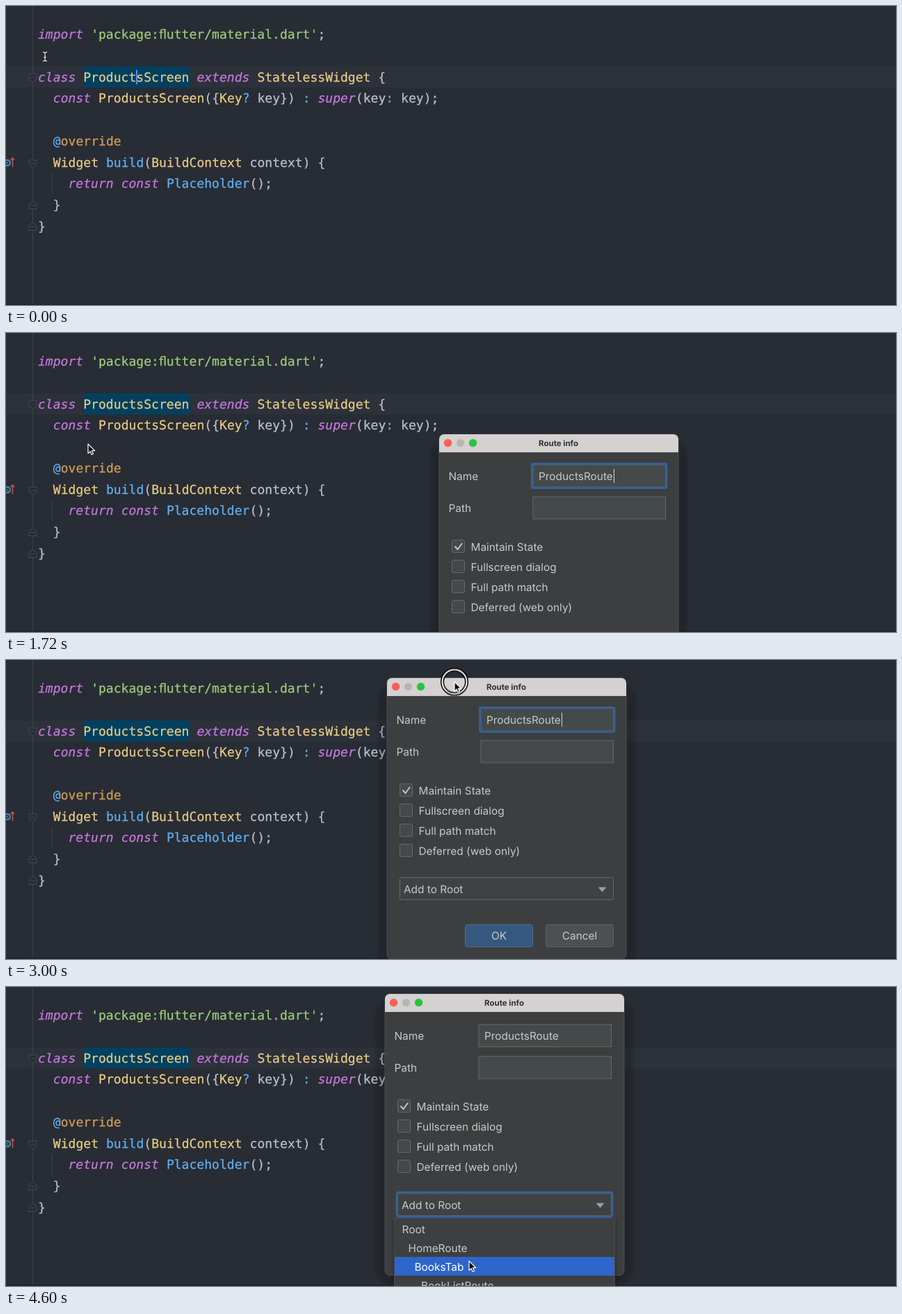
These frames come from a looping animation (1280x431 px, 4.64 s). An HTML page:

```html
<!DOCTYPE html>
<html lang="en">
<head>
<meta charset="utf-8">
<title>Add route from editor</title>
<style>
  html, body { margin: 0; width: 100%; height: 100%; overflow: hidden; background: #282c34; }
  svg { display: block; width: 100%; height: 100%; }
  text { white-space: pre; text-rendering: geometricPrecision; }

  /* A hairline stroke gives the code its slightly heavy weight. */
  .code { font: 18.07px "DejaVu Sans Mono", monospace; color: #bbbfc8; }
  .code text, .code tspan { fill: currentColor; stroke: currentColor; stroke-width: .25; }
  .key { color: #c678dd; font-style: italic; }
  .type { color: #e9cb82; }
  .str { color: #9bcb7b; }
  .fn { color: #61afef; }
  .note { color: #d19a56; }
  .fold { fill: #282c34; stroke: #454a52; }

  .ui { font: 15.4px Inter, sans-serif; fill: #c8cacb; }
  .menu { font-size: 15.3px; }
  .hint { font-size: 14.3px; fill: #7e8182; }
  .title { font-size: 11.5px; font-weight: 700; fill: #303030; }
  .white { fill: #fff; }
  .mid { text-anchor: middle; }
  .field { fill: #434a49; stroke: #666969; }
  .focus { fill: none; stroke: #365f97; stroke-width: 3; }
  .select { fill: #2e65ca; }
  .shadow { fill: #000; filter: url(#soft); }

  /* Hard switches and smooth moves share one 4640 ms loop. */
  .step, .move { animation: 4640ms infinite; }
  .step { animation-timing-function: step-end; }
  .move { animation-timing-function: linear; }

  .caret { animation-name: caret; }
  .bulb { animation-name: bulb; }
  .actions { animation-name: actions; }
  .action-row { animation-name: action-row; }
  .window { animation-name: window; }
  .drag { animation-name: drag; }
  .name-focus { animation-name: name-focus; }
  .list-focus, .list { animation-name: list; }
  .list-row { animation-name: list-row; }
  .cursor { animation-name: cursor; }
  .beam { animation-name: beam; }
  .hand { animation-name: hand; }
  .arrow { animation-name: arrow; }
  .ring { animation-name: ring; }

  @keyframes caret { 0% { opacity: 1 } 10.3%, 100% { opacity: 0 } }
  @keyframes bulb { 0% { opacity: 0 } 6.8% { opacity: 1 } 35.3%, 100% { opacity: 0 } }
  @keyframes actions { 0% { opacity: 0 } 16.3% { opacity: 1 } 35.3%, 100% { opacity: 0 } }
  @keyframes action-row { 0% { transform: translateY(-27px) } 23.2%, 100% { transform: none } }
  @keyframes window { 0% { opacity: 0 } 37%, 100% { opacity: 1 } }
  @keyframes drag {
    0%, 56.03% { transform: translate(623px, 146px) }
    56.9% { transform: translate(605px, 124px) }
    57.76% { transform: translate(581.5px, 95px) }
    59.48% { transform: translate(565px, 63px) }
    62.07% { transform: translate(553px, 38px) }
    64.66% { transform: translate(548px, 26px) }
    68.1%, 100% { transform: translate(545px, 10px) }
  }
  @keyframes name-focus { 0% { opacity: 1 } 88.7%, 100% { opacity: 0 } }
  @keyframes list { 0% { opacity: 0 } 88.7%, 100% { opacity: 1 } }
  @keyframes list-row {
    0% { transform: none }
    94.7% { transform: translateY(27px) }
    98.2%, 100% { transform: translateY(54px) }
  }
  @keyframes cursor {
    0%, 3.45% { transform: translate(56px, 73px); animation-timing-function: ease-in-out }
    12.93%, 16.38% { transform: translate(58px, 78px); animation-timing-function: ease-in-out }
    25%, 45.2% { transform: translate(118px, 160px); animation-timing-function: ease-in-out }
    54.31%, 55.17% { transform: translate(720px, 159px) }
    56.03% { transform: translate(702px, 137px) }
    56.9% { transform: translate(682px, 108px) }
    57.76% { transform: translate(671.5px, 92.5px) }
    59.48% { transform: translate(658px, 63px) }
    62.07% { transform: translate(649px, 42px) }
    64.66% { transform: translate(645px, 31.5px) }
    67.24%, 72% { transform: translate(642px, 23px); animation-timing-function: ease-in-out }
    78.45% { transform: translate(663px, 271px) }
    83.62% { transform: translate(664px, 300px) }
    86.2%, 90.5% { transform: translate(664px, 314px) }
    95.69%, 97.41% { transform: translate(665px, 370px) }
    99.14%, 100% { transform: translate(666px, 395px) }
  }
  @keyframes beam { 0% { opacity: 1 } 6.8%, 100% { opacity: 0 } }
  @keyframes hand { 0% { opacity: 0 } 6.8% { opacity: 1 } 35.3%, 100% { opacity: 0 } }
  @keyframes arrow { 0% { opacity: 0 } 35.3%, 100% { opacity: 1 } }
  @keyframes ring {
    0% { opacity: 0 }
    13.7% { opacity: 1 } 16.3% { opacity: 0 }
    33.6% { opacity: 1 } 35.3% { opacity: 0 }
    55.1% { opacity: 1 } 72.3% { opacity: 0 }
    86.9% { opacity: 1 } 88.7%, 100% { opacity: 0 }
  }
</style>
</head>
<body>
<svg viewBox="0 0 1280 431" preserveAspectRatio="none">
  <defs>
    <g id="fold"><path d="M-5.5-5.5h11v7l-5.5 4.5-5.5-4.5z"/><path d="M-3-.5h6"/></g>
    <g id="edit" fill="none" stroke="#b4b7b8" stroke-width="1.6">
      <path d="M0-5h11M0-1h7M0 3h4"/>
      <path d="M7 5l1-3 7-7 2 2-7 7z" fill="#b4b7b8" stroke="none"/>
    </g>
    <rect id="box" x="18.5" y="-8.5" width="18" height="18" rx="2.5"/>
    <path id="drop" d="M-6-3.5H6L0 3.5z"/>
    <path id="ibeam" d="M-3-6.5q3 0 3 2 0-2 3-2M0-5V5M-3 6.5q3 0 3-2 0 2 3 2M-1.5 1h3"/>
    <filter id="soft"><feGaussianBlur stdDeviation="2"/></filter>
  </defs>

  <!-- Editor -->
  <rect width="1280" height="431" fill="#282c34"/>
  <rect y="87" width="1280" height="30.5" fill="#2c313a"/>
  <rect x="111.5" y="87" width="153" height="30.5" fill="#03405f"/>
  <path d="M38.5 0V431" stroke="#3b3f47"/>
  <path d="M66.5 241V271" stroke="#3b4048"/>
  <rect y="429" width="1280" height="2" fill="#22262c"/>
  <g class="fold">
    <use href="#fold" x="38.5" y="103.5"/>
    <use href="#fold" x="38.5" y="227.5"/>
    <use href="#fold" transform="translate(38.5 287) scale(1 -1)"/>
    <use href="#fold" transform="translate(38.5 318) scale(1 -1)"/>
  </g>
  <g fill="none">
    <circle cx="2" cy="226" r="4" stroke="#3d83ad" stroke-width="2.5"/>
    <circle cx="2" cy="226" r="1.2" fill="#3d83ad"/>
    <path d="M9.5 232V219M7 222l2.5-3 2.5 3" stroke="#c75450" stroke-width="1.5"/>
  </g>
  <g class="code">
    <text x="46" y="47"><tspan class="key">import</tspan> <tspan class="str">'package:ﬂutter/material.dart'</tspan>;</text>
    <text x="46" y="108.5"><tspan class="key">class</tspan> <tspan class="type">ProductsScreen</tspan> <tspan class="key">extends</tspan> <tspan class="type">StatelessWidget</tspan> {</text>
    <text x="67.8" y="139.2"><tspan class="key">const</tspan> <tspan class="type">ProductsScreen</tspan>({<tspan class="type">Key</tspan><tspan class="fn">?</tspan> key}) <tspan class="fn">:</tspan> <tspan class="key">super</tspan>(key<tspan class="fn">:</tspan> key);</text>
    <text x="67.8" y="200.8"><tspan class="fn">@</tspan><tspan class="note">override</tspan></text>
    <text x="67.8" y="231.5"><tspan class="type">Widget</tspan> <tspan class="fn">build</tspan>(<tspan class="type">BuildContext</tspan> context) {</text>
    <text x="89.5" y="262.2"><tspan class="key">return</tspan> <tspan class="key">const</tspan> <tspan class="fn">Placeholder</tspan>();</text>
    <text x="67.8" y="293">}</text>
    <text x="46" y="323.7">}</text>
  </g>
  <rect class="step caret" x="187" y="92" width="2" height="21" fill="#528bff"/>

  <!-- Quick actions -->
  <g class="step bulb">
    <rect x="46.5" y="60.5" width="53" height="31" fill="#282c34" stroke="#4aa3bd"/>
    <path d="M59 80c0-2-4-3-4-7a7.5 7.5 0 0 1 15 0c0 4-4 5-4 7z" fill="#f2a526"/>
    <path d="M59 82.5h7M60 85h5" stroke="#b9bcbe" stroke-width="1.6"/>
    <use href="#drop" x="84" y="76" fill="#bbbfc3"/>
  </g>
  <g class="step actions ui menu">
    <rect class="shadow" x="44" y="119" width="300" height="99" opacity=".2"/>
    <rect x="46" y="118" width="296" height="98" fill="#464849"/>
    <rect x="46" y="183" width="296" height="33" fill="#424546"/>
    <rect class="step action-row select" x="46" y="150.5" width="296" height="27.5"/>
    <use href="#edit" x="66" y="137"/>
    <use href="#edit" x="66" y="164"/>
    <text x="97" y="142">Convert to StatefulWidget</text>
    <path d="M316.5 130.5l6 5.5-6 5.5" fill="none" stroke="#c0c2c3" stroke-width="1.7"/>
    <text class="white" x="97" y="169">Add to RootRouter</text>
    <text class="hint" x="60" y="205.5">Press ⌥Space to open preview</text>
  </g>

  <!-- Dialog -->
  <g class="step window"><g class="move drag ui">
    <rect class="shadow" x="-13" y="8" width="370" height="411" rx="22" opacity=".14"/>
    <rect width="344" height="405.5" rx="7" fill="#3d3e3f" stroke="#55585a" stroke-width=".8"/>
    <path d="M0 26V7a7 7 0 0 1 7-7H337a7 7 0 0 1 7 7V26z" fill="#d5d1d1"/>
    <circle cx="12.5" cy="12.5" r="5.7" fill="#fb5e57"/>
    <circle cx="30.5" cy="12.5" r="5.5" fill="#b7b4b4"/>
    <circle cx="48.5" cy="12.5" r="5.7" fill="#29c43f"/>
    <text class="title mid" x="171.5" y="16.5">Route info</text>

    <text x="13.5" y="66">Name</text>
    <rect class="field" x="135" y="44" width="190.5" height="32"/>
    <text x="143" y="66">ProductsRoute</text>
    <g class="step name-focus">
      <rect class="focus" x="133.5" y="42.5" width="193.5" height="35" rx="1.5"/>
      <path d="M251.5 50V70" stroke="#d0d2d3"/>
    </g>
    <text x="13.5" y="112">Path</text>
    <rect class="field" x="135" y="90" width="190.5" height="32"/>

    <g class="field">
      <use href="#box" y="161"/><use href="#box" y="190"/>
      <use href="#box" y="219"/><use href="#box" y="248"/>
    </g>
    <path d="M22.5 161.5l4 4.5 6.5-9" fill="none" stroke="#c4c6c7" stroke-width="2"/>
    <text x="45.5" y="167.5">Maintain State</text>
    <text x="45.5" y="196.5">Fullscreen dialog</text>
    <text x="45.5" y="225.5">Full path match</text>
    <text x="45.5" y="254.5">Deferred (web only)</text>

    <rect x="18.5" y="287.5" width="307" height="32" rx="2" fill="#3f4243" stroke="#666969"/>
    <rect class="step list-focus focus" x="17" y="286" width="310" height="35" rx="3"/>
    <text x="24" y="309.5">Add to Root</text>
    <use href="#drop" x="309.5" y="305" fill="#9a9da0"/>

    <rect x="112.5" y="355.5" width="97" height="32" rx="3" fill="#365880" stroke="#4c708c"/>
    <text class="mid" x="161" y="377">OK</text>
    <rect x="228.5" y="355.5" width="97" height="32" rx="3" fill="#4c5052" stroke="#606364"/>
    <text class="mid" x="277" y="377">Cancel</text>
  </g></g>

  <!-- Route list -->
  <g class="step list ui">
    <rect class="shadow" x="556" y="336" width="322" height="100" opacity=".2"/>
    <rect x="558.5" y="333.5" width="317" height="120" fill="#3d3f40" stroke="#494c4d"/>
    <rect class="step list-row select" x="559" y="335" width="316" height="27"/>
    <text x="569.5" y="354.5">Root</text>
    <text x="578.5" y="381.5">HomeRoute</text>
    <text class="white" x="587.5" y="408.5">BooksTab</text>
    <text x="597" y="435.5">BookListRoute</text>
  </g>

  <!-- Pointer -->
  <g class="move cursor">
    <g class="step ring" fill="none">
      <circle r="17.5" stroke="#000" stroke-width="5"/>
      <circle r="17.5" stroke="#fff" stroke-width="2"/>
    </g>
    <g class="step beam" fill="none">
      <use href="#ibeam" stroke="#111" stroke-width="3"/>
      <use href="#ibeam" stroke="#e8e8e8" stroke-width="1.3"/>
    </g>
    <path class="step hand" d="M-1.5 1.5q1-2 2.500 0L2 6q.5-1.5 2.200-.5l.4.9q1.5-1 2.400.6 1.800-.6 2 1.400 0 4-2 6v2.200H1v-2Q-1.500 12-3.500 9q.5-2 3 0z" fill="#fff" stroke="#111"/>
    <path class="step arrow" d="M0 0V13.5l3.100-2.900 2 4.700 2.300-1-2-4.600H9.700z" fill="#0a0a0a" stroke="#fff" stroke-width="1.2" stroke-linejoin="round"/>
  </g>
</svg>
</body>
</html>
```
